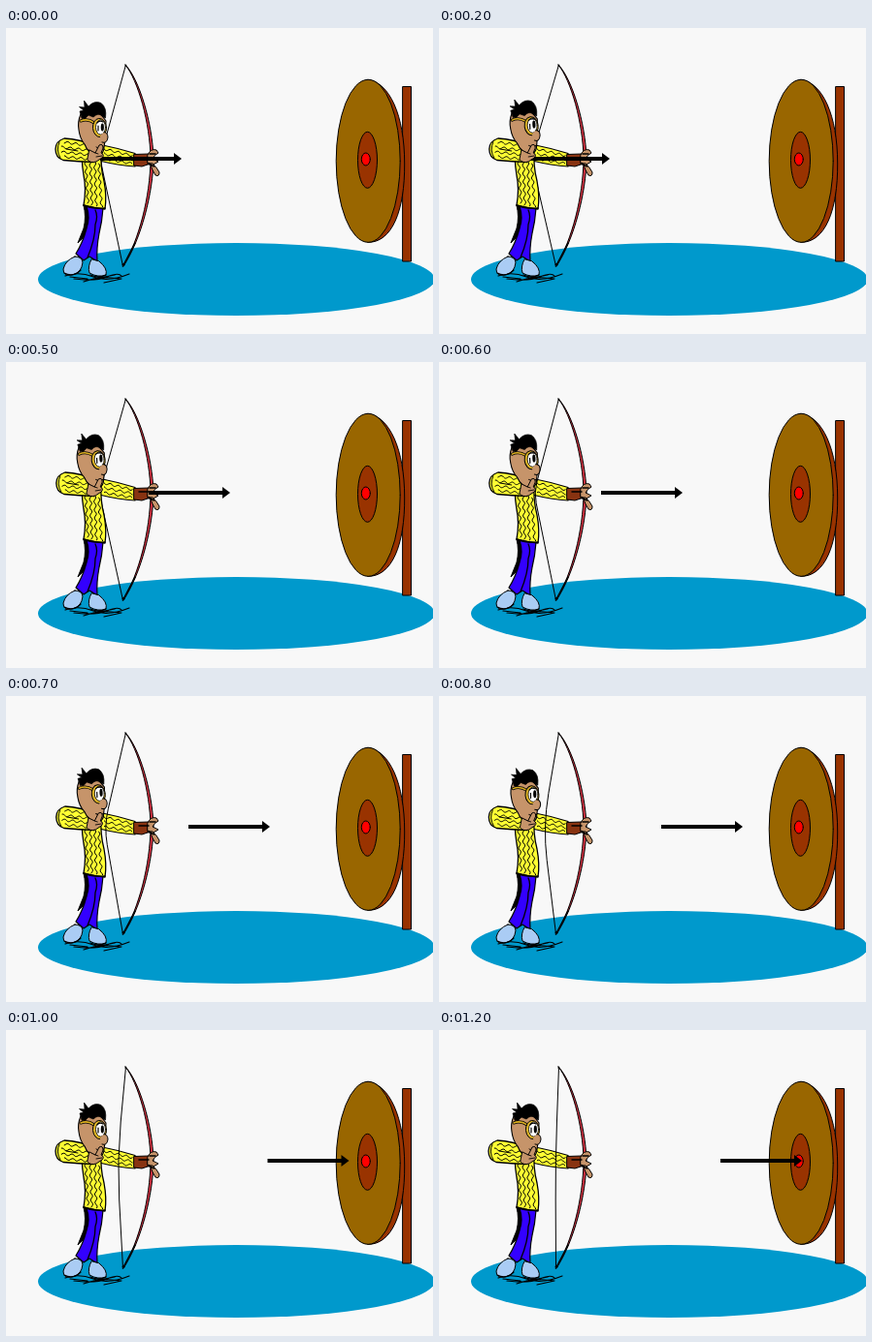
Animation of 440 by 316 pixels, one loop 1.3 s. Source, as an HTML page with a canvas:

```html
<!DOCTYPE html>
<html lang="en">
<head>
<meta charset="utf-8">
<title>Archer</title>
<style>
html, body { margin: 0; width: 100%; height: 100%; overflow: hidden; background: #f8f8f8; }
canvas { display: block; }
</style>
</head>
<body>
<canvas id="stage" width="440" height="316"></canvas>
<script>
const ctx = document.getElementById('stage').getContext('2d');
const STEP = 100;
const SKIN = '#c6946a', RUST = '#993300', YELLOW = '#ffff33', BLUE = '#3300ff', SHOE = '#aaccf4';

// One value per step: arrow tip, middle of the string, backward lean of the head.
const tipX = [181, 178, 176, 190, 210.5, 231, 251, 272, 313, 333, 353.5, 374, 374];
const stringX = [97, 96, 95, 95, 95, 96, 98, 101, 107, 111, 114.5, 117, 120];
const lean = [0, 0.5, 1, 1, 1, 1, 1, 0.9, 0.4, 0.2, 0, 0, 0];

function paint(path, fill, line = 1, color = '#000') {
  const p = typeof path === 'string' ? new Path2D(path) : path;
  if (fill) { ctx.fillStyle = fill; ctx.fill(p); }
  if (line) { ctx.lineWidth = line; ctx.strokeStyle = color; ctx.stroke(p); }
}

function oval(x, y, rx, ry, fill, line = 1, color = '#000', turn = 0) {
  const p = new Path2D();
  p.ellipse(x, y, rx, ry, turn, 0, Math.PI * 2);
  paint(p, fill, line, color);
}

// Wiggly knitting line between two points.
function knit(x0, y0, x1, y1, amp = 1.1, period = 8.5) {
  const dx = x1 - x0, dy = y1 - y0, len = Math.hypot(dx, dy);
  const p = new Path2D();
  for (let s = 0; s <= len; s++) {
    const w = amp * Math.sin(s * 2 * Math.PI / period + x0 + y0);
    p.lineTo(x0 + (dx * s - dy * w) / len, y0 + (dy * s + dx * w) / len);
  }
  paint(p, null, 1);
}

function scene() {
  ctx.fillStyle = '#f8f8f8';
  ctx.fillRect(0, 0, 440, 316);
  oval(237.3, 259.5, 204.3, 37.5, '#0099cc', 0);
  paint('M409 60.5H417.5V241H409Z', RUST);
  paint('M373 53.3C395 56 410.7 90 410.7 140C411 188 398 222 373 221.3Z', RUST);
  oval(373.2, 137.3, 33, 84, '#996600');
  oval(372.5, 136.3, 10, 29, RUST);
  oval(370.8, 135.5, 4.5, 6.5, '#ff0000');
}

function legs() {
  paint('M61 256Q75 251 90 257T127 254M70 259Q92 262 104 257T119 256M80 262L97 257L119 259L101 263M66 257L84 259M86 260L112 255', null, 1.2);
  paint('M80 183Q83 195 80 207L74 222Q84 214 86 200L85 184Z', '#000');
  paint('M83 184Q87 196 83 207Q79 222 72 233L80 240L86 236L94 241Q93 228 96 212Q99 200 100 186Z', BLUE, 1.2);
  paint('M92 188Q95 194 92 203Q92 218 84 237', null, 1.3);
  paint('M71 236Q61 240 59 249Q59 257 68 255Q78 253 79 242Q78 236 71 236Z', SHOE);
  paint('M88 239Q84 246 86 253Q95 258 103 255Q105 248 96 241Z', SHOE);
  paint('M60 253Q69 258 77 250M87 255Q96 259 103 255', null, 1.3);
}

function bow() {
  paint('M123 38C137 52 151 98 152 135C151.5 170 139.5 218 121 246C137 218 148.5 175 149 135C148.5 98 136 54 123 38Z', '#dd3344', 1);
  paint('M133 222L120.5 246', null, 1.6);
  oval(123.5, 39, 1, 1, '#000', 0);
  oval(121, 244.5, 1.4, 1.8, '#000', 0);
}

function frontArm() {
  paint('M95 120Q115 124 133 129.5L133 143Q116 142 96 137Z', YELLOW, 1.2);
  knit(101, 125, 131, 132);
  knit(101, 130, 131, 136);
  knit(101, 135, 130, 140);
  paint('M132 130.5L147 130L149 140L140 143L132 142Z', '#883311');
  paint('M146 131Q149 124 155 126L157 129Q153 131 151 135L157 138L152 141L146 139Z', SKIN, 1);
  paint('M151 140Q155 143 158 149Q158 154 154 152Q150 146 149 141Z', SKIN, 1);
  paint('M137 134H147M146 140L153 143M148 130L154 130', null, 1.5);
}

function bowstring(x) {
  const slack = Math.max(0, Math.min(1, (x - 97) / 12));
  const bend = 8 + slack * 32;
  const upX = x + (123.5 - x) * bend / 97, lowX = x + (120.5 - x) * bend / 111;
  const p = new Path2D();
  p.moveTo(123.5, 38);
  p.lineTo(upX, 135 - bend);
  p.quadraticCurveTo(x, 135, lowX, 135 + bend);
  p.lineTo(120.5, 246);
  paint(p, null, 1);
}

function torso(k) {
  paint('M79 117Q92 118 98 124Q97 143 101 158Q104 174 102 187Q91 186 80 183Q83 166 80 152Q77 134 79 117Z', YELLOW, 1.3);
  knit(82, 138, 84.5, 181);
  knit(87, 138, 88.5, 183);
  knit(91.5, 138, 93, 184);
  knit(95.5, 140, 98.5, 185);
  paint('M80 183Q90 187 102 186', null, 1.6);
  ctx.save();
  ctx.translate(k * 0.8, 0);
  paint('M91 121Q76 115 60 114Q51 117 51 125Q51 134 59 136.5Q75 138 90 138.5Z', YELLOW, 1.3);
  knit(60, 118, 86, 121.5);
  knit(57, 123, 87, 126.5);
  knit(57, 128, 86, 131);
  knit(60, 133, 86, 135.5);
  paint('M55 118Q51 126 56 134M62 125L74 127', null, 1);
  ctx.restore();
}

function head(k) {
  ctx.save();
  ctx.translate(100, 130 - 2 * k);
  ctx.rotate(-0.05 * k);
  ctx.translate(-100, -130);
  paint('M77 89Q73.5 97 75 105Q76 114 81 120Q85 131 95 132Q101 130 101 123L102 116L103 96L97 88Z', SKIN, 1.1);
  paint('M78 93L76 86L80 85L75.5 81.5L81 82L80.5 75L85 81Q91 74.5 98 77.5Q104 82 102.5 93L99 91Q95 87 90 92L85 90L81 94Z', '#000', 0.7);
  paint('M77 96Q84 93 91 98', null, 3);
  paint('M77 96Q84 93 91 98', null, 1.5, '#ddb020');
  oval(96.5, 103, 7, 9.6, '#e0b526', 1, '#000', -0.08);
  oval(97.5, 102.5, 5, 7.6, '#fff', 0.8);
  oval(99.3, 102.5 - k, 1.6, 4, '#000', 0);
  paint(`M94 ${98 - k}Q96 95 100 ${97 - k}M95 101V106`, null, 1.2);
  paint('M98 110Q104 105 105 113Q104 120 99 118Q95 116 98 110Z', SKIN, 0);
  paint('M101 107.5Q105 108 105 113Q104 120 99 118', null, 1);
  paint('M93 123Q97 126 101 123', null, 1);
  ctx.restore();
}

function arrow(x) {
  ctx.fillStyle = '#000';
  ctx.fillRect(x - 84, 133, 78, 4);
  paint(`M${x - 8} 129L${x} 135L${x - 8} 141Z`, '#000', 0);
}

function drawHand(k) {
  ctx.save();
  ctx.translate(-k * 0.8, 0);
  paint('M86 126L92 129L96 121Q100 119 100 124L98 129Q102 131 99 134L93 138Q87 140 84 136Z', SKIN, 1);
  paint('M93 133L99 132M92 129L95 130', null, 0.9);
  ctx.restore();
}

function draw(now) {
  const i = Math.floor(now / STEP) % tipX.length;
  const k = lean[i];
  ctx.lineJoin = ctx.lineCap = 'round';
  scene();
  legs();
  bow();
  frontArm();
  bowstring(stringX[i]);
  torso(k);
  head(k);
  arrow(tipX[i]);
  drawHand(k);
  requestAnimationFrame(draw);
}

draw(0);
</script>
</body>
</html>
```
